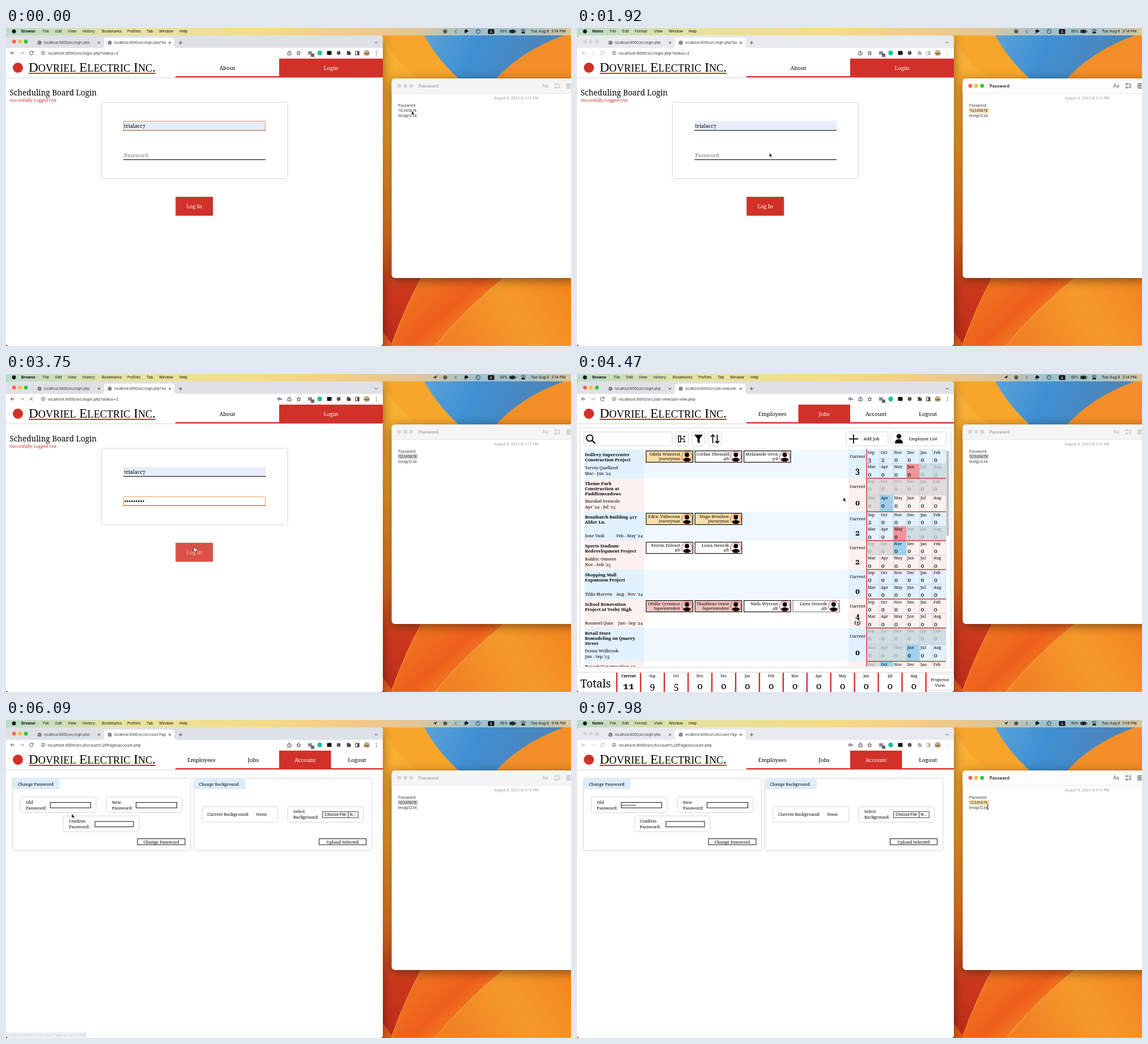
Animation, 997 px wide and 561 px high, one loop 8000 ms. Source, as an HTML page:

```html
<!DOCTYPE html>
<html lang="en">
<head>
<meta charset="utf-8">
<title>Scheduling board login</title>
<style>
  html, body { margin: 0; width: 100%; height: 100%; overflow: hidden; }
  svg { display: block; }
  text { font-family: "Noto Serif", serif; font-variant-numeric: oldstyle-nums; white-space: pre; }
  .ui { font-family: Inter, sans-serif; font-variant-numeric: normal; }
  .mid { text-anchor: middle; }
  .end { text-anchor: end; }
  .bold { font-weight: 700; }
  .semi { font-weight: 500; }
  .line { fill: none; stroke: #444; stroke-width: 1; }
  .card { filter: drop-shadow(0 0 1.8px rgba(0, 0, 0, .32)); }
  .window { filter: drop-shadow(0 4px 9px rgba(0, 0, 0, .45)); }
</style>
</head>
<body>
<svg id="stage" width="997" height="561" viewBox="0 0 997 561"></svg>
<script>
(() => {
const LOOP = 8000, RED = '#d13128', INK = '#333';
const MONTHS = 'Sep Oct Nov Dec Jan Feb Mar Apr May Jun Jul Aug'.split(' ');

// Drawing helpers, each returning markup
const rect = (x, y, w, h, fill, more = '') =>
  `<rect x="${x}" y="${y}" width="${w}" height="${h}" fill="${fill}" ${more}/>`;
const circle = (x, y, r, fill, more = '') => `<circle cx="${x}" cy="${y}" r="${r}" fill="${fill}" ${more}/>`;
const path = (d, more = 'class="line"') => `<path d="${d}" ${more}/>`;
const text = (x, y, size, str, cls = '', fill = '#000') =>
  `<text x="${x}" y="${y}" font-size="${size}" class="${cls}" fill="${fill}">${str}</text>`;
const ui = (x, y, size, str, cls = '', fill = INK) => text(x, y, size, str, 'ui ' + cls, fill);
const card = (x, y, w, h, r = 1) => rect(x, y, w, h, '#fff', `rx="${r}" class="card"`);
const box = (x, y, w, h, fill = '#fff', stroke = '#111') => rect(x, y, w, h, fill, `stroke="${stroke}"`);
const when = (key, body) => `<g data-when="${key}">${body}</g>`;
const gradient = (id, [x1, y1, x2, y2], ...colors) =>
  `<linearGradient id="${id}" gradientUnits="userSpaceOnUse" x1="${x1}" y1="${y1}" x2="${x2}" y2="${y2}">` +
  colors.map(([at, color]) => `<stop offset="${at}" stop-color="${color}"/>`).join('') + '</linearGradient>';
const clip = (id, body) => `<clipPath id="${id}">${body}</clipPath>`;
const lights = (x, y, colors) => colors.map((c, i) => circle(x + i * 10.4, y, 3.4, c)).join('');
const dots = (x, y, gap, r) => Array.from({ length: 9 }, (_, i) => circle(x + i * gap, y, r, '#111')).join('');
const LIT = ['#ff5f57', '#febc2e', '#28c840'];
const dim = c => [c, c, c];

const defs = '<defs>' +
  gradient('sky', [0, 13, 0, 561], [0, '#f9b436'], [.35, '#f59f27'], [.65, '#ec751f'], [.82, '#cc381c'], [1, '#bd2b1a']) +
  gradient('blue', [740, 13, 900, 95], [0, '#5ba3d8'], [.5, '#3e8fd2'], [1, '#4b86bd']) +
  gradient('petal', [700, 450, 800, 561], [0, '#ef7a20'], [.6, '#ee5f1c'], [1, '#f28a25']) +
  gradient('leaf', [800, 561, 997, 441], [0, '#f08224'], [.5, '#f59a2a'], [1, '#f28420']) +
  gradient('bar', [0, 0, 997, 0], [0, '#b9dccb'], [.2, '#e6e3a0'], [.45, '#f6dc86'], [.63, '#f3c987'],
    [.73, '#dfc79a'], [.83, '#9dc0cf'], [.93, '#a9c4c6'], [1, '#d9c79c']) +
  clip('frame', rect(0, 13, 665, 548, '#fff', 'rx="5"')) +
  clip('list', rect(6, 133, 653, 383, '#fff')) +
  clip('face', circle(0, 0, 8.6, '#fff')) +
  `<g id="person">${circle(0, 0, 9.3, 'none', `stroke="${RED}"`)}<g clip-path="url(#face)">` +
  `${circle(0, -3, 4, '#000')}<ellipse cy="7.6" rx="7.4" ry="5.6"/></g></g></defs>`;

const wallpaper = rect(0, 0, 997, 561, 'url(#sky)') +
  path('M665 13H738Q765 55 805 95H740Q690 70 665 13', 'fill="#f7a62b"') +
  path('M738 13Q762 57 805 95H860Q905 42 985 13Z', 'fill="url(#blue)"') +
  path('M860 95Q905 42 985 13H997V95Z', 'fill="#f28f28"') +
  path('M736 435Q705 490 681 557V561H790L890 435Z', 'fill="url(#petal)" stroke="#f7a04c"') +
  path('M886 435Q812 493 757 561H1000V435Z', 'fill="url(#leaf)" stroke="#f9b562"') +
  path('M660 529L681 557V561H660Z', 'fill="#e2591e"');

const menu = items => items.map(([x, s], i) => ui(x, 8.4, i ? 6.6 : 6.8, s, i ? '' : 'bold', '#111')).join('');
const menuBar = rect(0, 0, 997, 13, 'url(#bar)') + circle(14, 6, 3.4, '#111') +
  when('browser', menu([[27, 'Browse'], [65, 'File'], [87, 'Edit'], [109, 'View'], [135, 'History'],
    [169, 'Bookmarks'], [214, 'Profiles'], [248, 'Tab'], [270, 'Window'], [306, 'Help']])) +
  when('notes', menu([[27, 'Notes'], [58, 'File'], [80, 'Edit'], [102, 'Format'], [136, 'View'],
    [162, 'Window'], [197, 'Help']])) +
  when('located', path('M753.5 6.2L760.5 2.5L757 9.5V6.2Z', 'fill="#111"')) +
  circle(775, 6, 3, 'none', 'stroke="#111"') + circle(775, 6, 1.6, '#111') +
  path('M795 3L792.5 6L795 9') +
  path('M812 2L816 6L813 7L811 9L809 5ZM808 10L811 7', 'fill="#111" stroke="#111" stroke-width=".7"') +
  circle(833, 6, 3.6, 'none', 'stroke="#222" stroke-width=".9"') + path('M833 6L831 4') +
  rect(850.5, 2, 11, 8.5, '#111', 'rx="1.5"') + ui(856, 8.5, 6.5, 'A', 'mid', '#fff') +
  ui(872, 8.2, 6, '80%', '', '#111') + rect(888.5, 3.2, 10, 5.6, '#222', 'rx="1.4"') +
  path('M900 5V7.5M894.5 2L892.5 6H895.5L893.5 10', 'fill="none" stroke="#222"') +
  rect(909.5, 2.6, 6.5, 2.8, 'none', 'rx="1.4" stroke="#111" stroke-width=".8"') +
  rect(909.5, 6.8, 6.5, 2.8, '#111', 'rx="1.4"') +
  ui(926, 8.4, 6.7, 'Tue Aug 8  3:14 PM', '', '#111');

// Browser frame
const globe = x => circle(x, 26, 3.4, '#5f6368') + path(`M${x - 3} 25.5Q${x} 27 ${x + 1} 23.5M${x - 1} 29L${x + 2} 26`,
  'fill="none" stroke="#fff" stroke-width=".8"');
const cross = (x, y, r = 1.8) => path(`M${x - r} ${y - r}l${2 * r} ${2 * r}m0 ${-2 * r}l${-2 * r} ${2 * r}`);
const page = (key, title, url) => when(key,
  `<svg x="191" y="18" width="91" height="16">${ui(0, 10.1, 5.9, title)}</svg>` + ui(74, 46.6, 6.8, url));
const toolbar = rect(0, 13, 665, 22, '#dee1e6') + when('notes', rect(0, 13, 665, 22, '#e8eaed')) +
  path('M168 35Q173 35 173 30V22Q173 17 178 17H292Q297 17 297 22V30Q297 35 302 35Z', 'fill="#fff"') +
  rect(0, 35, 665, 19, '#fff') +
  when('browser', lights(14.2, 24, LIT)) + when('notes', lights(14.2, 24, dim('#d3d5d9'))) +
  globe(59) + ui(67, 28.1, 5.9, 'localhost:8000/src/login.php') + cross(164, 26) +
  globe(183) + cross(289, 26) + path('M305 26H311M308 23V29') + path('M650.5 24.5L653 27L655.5 24.5') +
  page('login', 'localhost:8000/src/login.php?status=2', 'localhost:8000/src/login.php?status=2') +
  page('board', 'localhost:8000/src/job-view/job-view.php', 'localhost:8000/src/job-view/job-view.php') +
  page('account', 'localhost:8000/src/Account Page/account.php', 'localhost:8000/src/Account%20Page/account.php') +
  `<g id="tools">${path('M15 44H8.5M11.3 41L8.3 44L11.3 47')}` +
  path('M24.5 44H31M28.2 41L31.2 44L28.2 47', 'class="line" opacity=".45"') +
  when('loading', cross(44.5, 44, 2.6)) + when('loaded', path('M47.5 42.5A3.2 3.2 0 1 0 47.8 45M48 40.5V43H45.5')) +
  path('M602 41H606V43H608V47H602Z', 'fill="#444" stroke="#444"') +
  rect(616.5, 41, 6.5, 6.5, 'none', 'stroke="#444"') + rect(620, 41, 3, 6.5, '#444') +
  [41.3, 44.2, 47.1].map(y => circle(653.5, y, .8, '#444')).join('') + '</g>' +
  circle(65.5, 44, 3, 'none', 'stroke="#444" stroke-width=".8"') + path('M65.5 43.5V46M65.5 42V42.8') +
  when('key', circle(481.5, 44, 1.8, 'none', 'stroke="#444" stroke-width="1.2"') + path('M483 44H487M486 44V46')) +
  path('M498.5 43H497V47.5H503V43H501.5M500 45.5V40.5M498.5 42L500 40.3L501.5 42') +
  path('M516.5 40.5L517.5 43L520 43.2L518 45L518.7 47.6L516.5 46.2L514.3 47.6L515 45L513 43.2L515.5 43Z') +
  rect(533, 41, 7, 6, '#8a8d91') + rect(538, 45, 6, 6, '#666', 'rx="1"') + circle(553.5, 44, 4.2, '#15c39a') +
  rect(566.5, 40.5, 8, 7, '#111', 'rx="1"') + circle(587, 44, 3.4, '#555') +
  circle(636.5, 44, 5.3, '#c9b08a') + rect(632, 44, 9, 2.5, '#8b6b45');

// Site header
const tabs = (names, active) => names.map((name, i) => {
  const w = 366 / names.length, x = 299 + i * w;
  return (i == active ? rect(x, 54, w, 33, RED) : '') +
    text(x + w / 2, 73.8, 9.7, name, 'mid semi', i == active ? '#fff' : '#000');
}).join('');
const smallCaps = s => s.replace(/\b([A-Z])([a-z]+)/g, (_, a, b) => `${a}<tspan font-size="18.2">${b.toUpperCase()}</tspan>`);
const member = ['Employees', 'Jobs', 'Account', 'Logout'];
const header = rect(0, 54, 665, 33, '#fff', 'class="card"') + circle(21, 70, 9, RED) +
  rect(40, 79, 224, 2, RED) +
  `<text x="40" y="76.5" font-size="23.3" style="font-family:'Liberation Serif',serif">${smallCaps('Dovriel Electric Inc.')}</text>` +
  rect(299, 85, 366, 2.2, RED) + when('login', tabs(['About', 'Login'], 1)) +
  when('board', tabs(member, 1)) + when('account', tabs(member, 2));

const login = text(6.5, 119, 13.5, 'Scheduling Board Login') +
  text(6.5, 130, 7.5, 'Succesfully Logged Out', '', '#c62a22') + card(169, 132, 327, 133) +
  rect(207, 164, 251, 17, '#e6eefb') + rect(207, 180, 251, 1.2, '#222') +
  when('userFocus', rect(207.5, 164.3, 250, 16.4, 'none', 'rx="1.5" stroke="#e8915c"')) +
  text(208.5, 175.6, 9, 'trialacc7', 'semi') + rect(207, 231.6, 251, 1.3, '#222') +
  when('empty', text(208.5, 227.6, 9.2, 'Password', '', '#777')) +
  when('passFocus', rect(207.5, 216.3, 250, 16.2, 'none', 'rx="1.5" stroke="#e59a4e"')) +
  when('typed', dots(210.5, 224.4, 4, 1.4)) +
  when('plain', rect(299.5, 298, 65.5, 33, RED, 'class="card"') + text(332.3, 318.4, 9.2, 'Log In', 'mid semi', '#fff')) +
  when('hover', rect(299.5, 298, 65.5, 33, '#db5146', 'class="card"') + text(332.3, 318.4, 9.2, 'Log In', 'mid semi', '#ecc9c4'));

// Job board: height, title, manager, dates, stacked, month marks, current, crew, first month counts
const jobs = [
  [51, 'Dollrey Supercenter|Construction Project', 'Torvin Quelland', "Mar - Jun '24", 1, '.........rgg', 3,
    'Odela Wimrest:Journeyman|Corbin Thessaldyne:4th|Melisande Orvakel:3rd', '32'],
  [59, 'Theme Park|Construction at|Puddlemeadows', 'Marabel Fenwole', "Apr '24 - Jul '25", 1, 'gggggggb....', 0, ''],
  [51, 'Beanhatch Building 417|Alder Ln.', 'Ione Vask', "Feb - May '24", 0, '........rggg', 2,
    'Edric Valmoran:Journeyman|Hugo Brenlow:Journeyman', '2'],
  [51, 'Sports Stadium|Redevelopment Project', 'Baldric Osmere', "Nov - Feb '25", 1, 'ggb.........', 2,
    'Perrin Tolvast:4th|Liora Stenvik:4th'],
  [52, 'Shopping Mall|Expansion Project', 'Tilda Morven', "Aug - Nov '24", 0, '............', 0, ''],
  [51, 'School Renovation|Project at Vesby High', 'Rosamel Quin', "Jun - Sep '24", 0, '............', 4,
    'Ottilie Crenmor:Superintendent|Thaddeus Ormewell:Superintendent|Niels Wyrran:4th|Liora Stenvik:4th:planned'],
  [59, 'Retail Store|Remodeling on Quarry|Street', 'Fenna Wolbrook', "Jun - Sep '25", 1, 'gggggggggb..', 0, ''],
  [59, 'Resort Construction on', '', '', 1, 'gb..........', 0, ''],
];
const badgeFill = { Journeyman: '#fddfa6', Superintendent: '#f6c4c1' };
const badge = (spec, i, y) => {
  const [name, role, planned] = spec.split(':'), x = 122 + i * 86.3, long = name.length > 15;
  return rect(x, y + 2.6, 82.5, 20, badgeFill[role] || '#fff',
      `stroke="#111" stroke-width="1.2" ${planned ? 'stroke-dasharray="1.5 1.5"' : ''}`) +
    `<svg x="${x + 2}" y="${y + 3}" width="58.5" height="20">` +
    text(long ? .5 : 58, 8.2, 7.6, name, long ? '' : 'end') + text(58, 16.4, 6.3, role, 'end') + '</svg>' +
    `<use href="#person" x="${x + 72}" y="${y + 12.6}"/>`;
};
const monthCell = (mark, i, rowY, h, blue, count) => {
  const x = 511.5 + i % 6 * 23.25, y = rowY + (i > 5 ? h / 2 : 0), ink = mark == 'g' ? '#8f969b' : '#000';
  const fill = { g: blue ? '#cfdde5' : '#e0dbda', b: '#9fd1ee', r: '#f0959a' }[mark] || (blue ? '#e1f1fe' : '#fdf1ef');
  return rect(x, y, 23.25, h / 2, fill, 'stroke="#bcc8cf" stroke-width=".6"') +
    text(x + 1.5, y + 7.8, 7.2, MONTHS[i], '', ink) + text(x + 2, y + 22, 10.5, count, 'semi', ink);
};
let nextRow = 133;
const rows = jobs.map(([h, title, manager, dates, stacked, marks, current, crew, counts = ''], n) => {
  const y = nextRow, blue = n % 2 == 0, tint = blue ? '#e1f1fe' : '#fdf1ef', low = y + h - 6;
  nextRow += h;
  return rect(13, y, 106, h, tint) + rect(120, y, 359, h, blue ? '#eff8ff' : '#fff') + rect(479, y, 32, h, tint) +
    title.split('|').map((s, i) => text(14, y + 11.6 + i * 9.2, 7.7, s, 'bold')).join('') +
    text(14, stacked ? low - 10.5 : low, 7.5, manager) +
    text(stacked ? 14 : 116, low, 7.5, dates, stacked ? '' : 'end') +
    (crew ? crew.split('|').map((s, i) => badge(s, i, y)).join('') : '') +
    text(495, y + h * .24 + 2.6, 7.4, 'Current', 'mid') +
    text(495, y + h * (n == 5 ? .6 : .74) + 4.6, 14, current, 'mid bold') +
    (n == 5 ? text(495, y + 45, 8, '(3)', 'mid bold') : '') +
    [...marks].map((m, i) => monthCell(m, i, y, h, blue, counts[i] || 0)).join('') +
    (n ? rect(511, y - .7, 140, 1.4, RED) : '');
}).join('');
const totals = ['Current', ...MONTHS].map((m, i) => {
  const x = 91 + i * 41.95, cls = i ? 'mid' : 'mid bold';
  return rect(x - 22, 527, 2.4, 34, RED) + text(x, 534.8, 6.4, m, cls + (i ? ' semi' : '')) +
    text(x, 556, 17, [11, 9, 5][i] || 0, cls + (i ? ' semi' : ''));
}).join('');
const board = card(6, 96, 653, 421, 2) + card(13, 103, 154, 23, 3) +
  circle(22.5, 113, 5.6, 'none', 'stroke="#111" stroke-width="2"') + path('M26.5 117L32 122.5', 'stroke="#111" stroke-width="2.4"') +
  [174, 203, 232].map(x => card(x, 103, 22, 23, 3)).join('') +
  path('M179 109H183V120H179ZM183 114.5H190M187 110H190V112M187 119.5H190V117', 'fill="none" stroke="#111" stroke-width="1.6"') +
  path('M207 107H222L216.5 114V122.5L212.5 120V114Z', '') +
  path('M239.5 122V107.5M236 111L239.5 107L243 111M247.5 107V121.5M244 118L247.5 122L251 118', 'fill="none" stroke="#111" stroke-width="1.8"') +
  card(476, 103, 72, 23, 3) + path('M480 114.5H496M488 106.5V122.5', 'stroke="#111" stroke-width="2"') +
  text(505.5, 117.2, 7.6, 'Add Job', 'semi') + card(555, 103, 96, 23, 3) + circle(568, 110, 4.2, '#111') +
  path('M561 122.5Q561 115 568 115T575 122.5Z', '') + text(585.5, 117.2, 7.5, 'Employee List', 'semi') +
  `<g clip-path="url(#list)">${rows}${rect(510.5, 133, 1.4, 383, RED)}</g>` +
  rect(652, 135, 4.5, 151, '#c3c3c3', 'rx="2.2"') +
  rect(0, 527, 665, 34, '#fff', 'class="card"') + text(6, 553, 19, 'Totals') + totals +
  rect(614.5, 527, 2.4, 34, RED) + card(620, 530, 41, 27, 2) +
  text(640.5, 542.3, 7.5, 'Projector', 'mid') + text(640.5, 552, 7.5, 'View', 'mid');

const field = (x, y, label, inputX, inputW) => card(x, y, 132, 26) +
  label.split('|').map((s, i) => text(x + 9, y + 11.2 + i * 9.8, 7.5, s)).join('') + box(inputX, y + 9, inputW, 9.5);
const account = card(12, 103.5, 313, 126) + card(332, 103.5, 313, 126) +
  rect(12, 104, 82.5, 18, '#dcedfb') + text(21, 115.8, 7.5, 'Change Password') +
  rect(332.5, 104, 90.5, 18, '#dcedfb') + text(340.5, 115.8, 7.4, 'Change Background') +
  field(26, 136.5, 'Old|Password:', 78, 71.5) + field(178, 136.5, 'New|Password:', 229.5, 72) +
  field(102, 170, 'Confirm|Password:', 157, 68) +
  when('oldFocus', rect(77.5, 145, 72.5, 10.5, 'none', 'rx="1" stroke="#e59a4e"')) +
  when('oldTyped', dots(80.5, 150.4, 2.8, .9)) +
  box(232, 209.5, 84, 10.5) + text(274, 217.5, 7.5, 'Change Password', 'mid') +
  card(347, 153.5, 132, 26) + text(355, 169.2, 7.4, 'Current Background:') + text(441.5, 169.2, 7.4, 'None') +
  card(498, 153.5, 132, 26) + text(507, 164.2, 7.4, 'Select') + text(507, 174, 7.4, 'Background:') +
  box(558.5, 161.5, 63, 11, '#f3f3f3', '#555') + rect(559, 162, 45, 10, '#ececec') + path('M604 161.5V172.5') +
  ui(562.5, 169.2, 6.7, 'Choose File', '', '#111') + ui(606.5, 169.2, 6.7, 'N...', '', '#111') +
  box(552.5, 209.5, 83, 10.5) + text(594, 217.5, 7.5, 'Upload Selected', 'mid');

const linkHint = `<g id="linkHint">${path('M0 550H140Q143 550 143 553V561H0Z', 'fill="#dfe1e5"')}` +
  ui(2, 558, 6.1, 'localhost:8000/src/Account Page/account.php<tspan id="hash">#</tspan>', '', '#666') + '</g>';

const browser = rect(0, 13, 665, 548, '#fff', 'rx="5" class="window"') +
  `<g clip-path="url(#frame)">${rect(0, 13, 665, 548, '#fff')}${header}${toolbar}` +
  when('login', login) + when('board', board) + when('account', account) + linkHint + '</g>';

const notes = rect(680.5, 89, 330, 352, '#fff', 'rx="6" class="window"') +
  path('M680.5 115.5V95Q680.5 89 686.5 89H997V115.5Z', 'id="noteBar"') + rect(681, 115, 316, .8, '#e3e3e3') +
  when('notes', lights(694, 102, LIT)) + when('browser', lights(694, 102, dim('#d6d6d6'))) +
  `<g id="noteTools">${ui(728, 104.8, 7.3, 'Password', 'bold')}${ui(946, 105, 8.6, 'Aa', '', '#555')}` +
  path('M973 99H978M973 105H978M974 102.2H978') + circle(970, 99, 1.3, 'none', 'stroke="#444"') + circle(970, 105, 1.3, 'none', 'stroke="#444"') +
  rect(990, 98.5, 10, 7.5, 'none', 'stroke="#444"') + path('M990 102.2H997M993.5 98.5V106') + '</g>' +
  ui(900, 126.4, 6.3, 'August 8, 2023 at 3:13 PM', 'mid', '#999') +
  '<rect id="selection" y="141.3" height="8.6"/>' +
  ['Password', '!12345678', 'test@1234'].map((s, i) => ui(692, 139.3 + i * 8.9, 6.6, s)).join('');

const pointer = '<g id="pointer">' +
  when('arrow', path('M0 0V7.6L1.8 6L3.1 8.7L4.4 8.1L3.1 5.5H5.4Z', 'fill="#111" stroke="#fff" stroke-width=".6"')) +
  when('hand', path('M-.8 -.5Q.2 -1.2 .8 0L1.3 2.2L4 2.9Q5 3.3 4.6 5.2L3.8 8H-.2L-3 4.6Q-2.6 3.5 -1 4.8Z', 'fill="#fff" stroke="#111" stroke-width=".8"')) +
  when('beam', path('M-1.5 -4Q0 -4 0 -3V3Q0 4 -1.5 4M1.5 -4Q0 -4 0 -3M0 3Q0 4 1.5 4', 'fill="none" stroke="#111" stroke-width=".9"')) + '</g>';

const stage = document.getElementById('stage');
stage.innerHTML = defs + wallpaper + notes + browser + menuBar + pointer;
const parts = [...stage.querySelectorAll('[data-when]')];
const [tools, noteBar, noteTools, selection, hint, hash, cursor] =
  ['tools', 'noteBar', 'noteTools', 'selection', 'linkHint', 'hash', 'pointer'].map(id => document.getElementById(id));

// Pointer stops: time, x, y, shape from then on
const stops = [
  [0, 716, 146, 'arrow'], [250, 727, 146, 'arrow'], [400, 727, 146, 'beam'], [500, 727, 146, 'beam'],
  [1000, 692, 146, 'beam'], [1200, 692, 146, 'arrow'], [1880, 339.5, 220.3, 'arrow'], [2080, 339.5, 220.3, 'beam'],
  [2600, 339.5, 222, 'arrow'], [3100, 332.5, 305, 'hand'], [3850, 332.5, 305, 'arrow'], [4470, 469.8, 217.5, 'arrow'],
  [4850, 529.5, 71, 'hand'], [5650, 529.5, 71, 'arrow'], [6090, 116, 165.5, 'arrow'], [6300, 112, 150, 'beam'],
  [6950, 112, 150, 'arrow'], [7650, 725, 154, 'arrow'], [7800, 725, 154, 'beam'], [LOOP, 725, 154, 'beam'],
];
function pointerAt(t) {
  const i = stops.findIndex(s => s[0] > t), [t0, x0, y0, shape] = stops[i - 1], [t1, x1, y1] = stops[i];
  const u = (t - t0) / (t1 - t0), k = u * u * (3 - 2 * u);
  return { x: x0 + (x1 - x0) * k, y: y0 + (y1 - y0) * k, shape };
}

function draw(t) {
  const within = (a, b = LOOP) => t >= a && t < b;
  const notesActive = within(350, 2080) || within(7800), p = pointerAt(t);
  const loading = within(3620, 3900) || within(5030, 5400), hover = within(3050, 3850);
  const state = {
    notes: notesActive, browser: !notesActive, located: within(2100),
    login: t < 3800, board: within(3800, 5080), account: within(5080),
    loading, loaded: !loading, key: within(2450, 5080) || within(6750),
    userFocus: t < 350, passFocus: within(2080, 3800), empty: t < 2450, typed: within(2450),
    hover, plain: !hover, oldFocus: within(6400, 7800), oldTyped: within(6750), [p.shape]: true,
  };
  for (const el of parts) el.style.display = state[el.dataset.when] ? '' : 'none';
  cursor.setAttribute('transform', `translate(${p.x} ${p.y})`);
  tools.style.opacity = notesActive ? .4 : 1;
  noteTools.style.opacity = notesActive ? 1 : .4;
  noteBar.style.fill = notesActive ? '#fdfdfd' : '#f5f5f5';
  const left = within(500, 1000) ? p.x : 692;
  selection.setAttribute('x', left);
  selection.setAttribute('width', t < 500 ? 0 : 727 - left);
  selection.style.fill = notesActive ? '#fbdfae' : '#d6d6d6';
  hint.style.opacity = within(4880) ? Math.max(0, Math.min(1, (6150 - t) / 150)) : 0;
  hash.style.display = t < 5500 ? 'none' : '';
}
(function tick() {
  draw(performance.now() % LOOP);
  requestAnimationFrame(tick);
})();
})();
</script>
</body>
</html>
```
